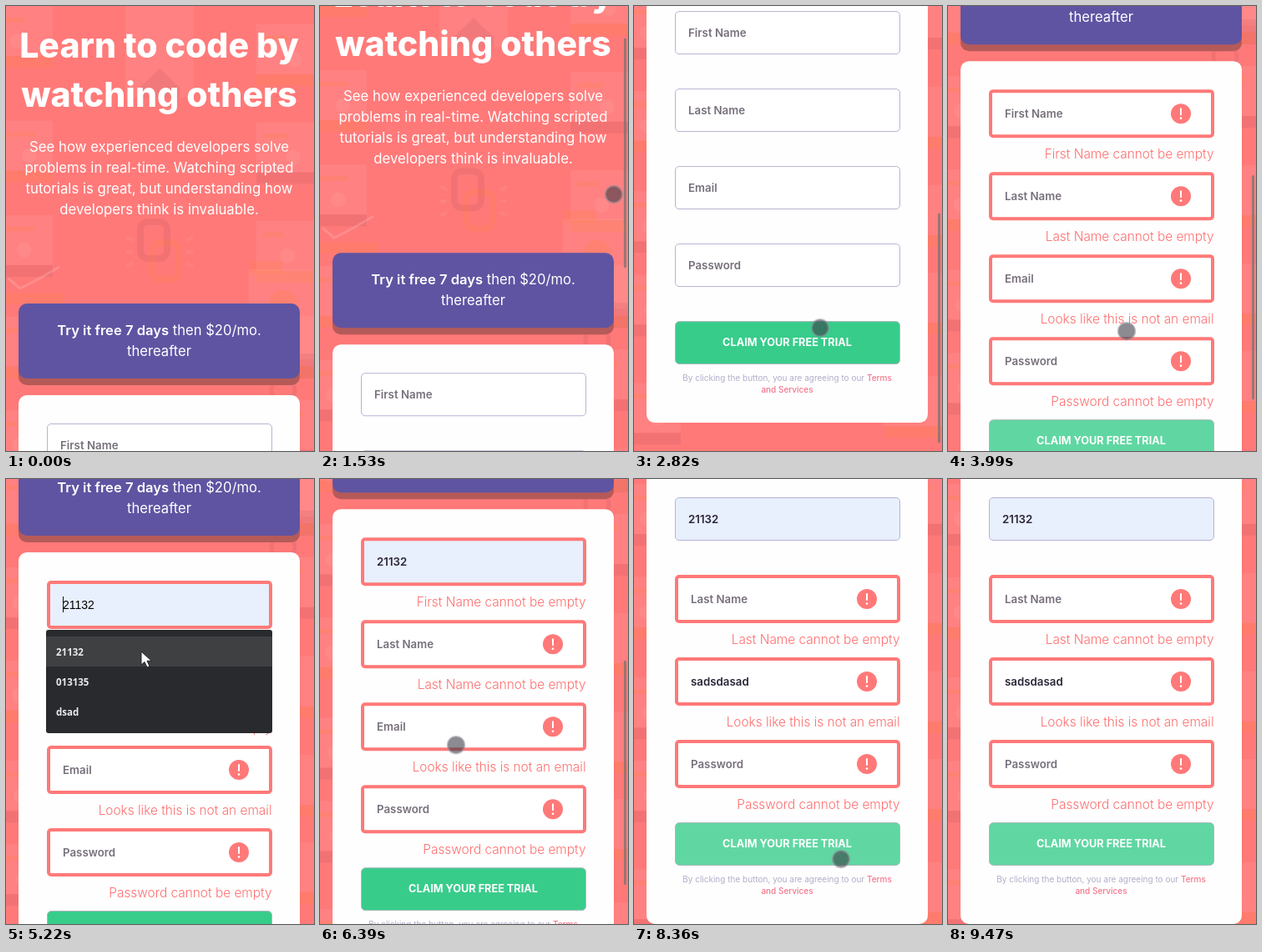
An HTML page that plays this animation: 369 px wide and 534 px high, repeating every 9800 ms.

```html
<!DOCTYPE html>
<html lang="en">
<head>
<meta charset="utf-8">
<title>Sign-up form</title>
<style>
  html, body { margin: 0; width: 100%; height: 100%; overflow: hidden; background: #ff7979; }
  svg { display: block; width: 369px; height: 534px; }
  text { font-family: Inter, "Open Sans", sans-serif; white-space: pre; }
  .mid { text-anchor: middle; }
  .title { font-size: 41px; font-weight: 800; fill: #fff; }
  .intro { font-size: 16.8px; fill: #fff; }
  .offer { font-size: 16.6px; fill: #fff; }
  .offer .strong { font-weight: 600; }
  .entry { font-size: 13.3px; font-weight: 600; }
  .preview { font: 14px "Liberation Sans", Arial, sans-serif; }
  .error { font-size: 15.4px; font-weight: 300; fill: #ff6f70; text-anchor: end; }
  .claim { font-size: 12.7px; font-weight: 700; fill: #fff; }
  .terms { font-size: 10px; fill: #b3aec9; }
  .terms .link { fill: #f5758b; font-weight: 500; }
  .option { font: 700 11.5px "Open Sans", sans-serif; fill: #e8eaed; }
</style>
</head>
<body>
<svg id="stage" viewBox="0 0 369 534"></svg>
<script>
const LOOP = 9800;
const CORAL = '#ff7979';
const stage = document.getElementById('stage');

function add(parent, tag, attrs = {}, text) {
  const el = document.createElementNS('http://www.w3.org/2000/svg', tag);
  set(el, attrs);
  if (text !== undefined) el.textContent = text;
  parent.append(el);
  return el;
}
function set(el, attrs) {
  for (const key in attrs) el.setAttribute(key, attrs[key]);
}
const show = (el, opacity) => set(el, { opacity: +opacity });
const move = (el, x, y) => set(el, { transform: `translate(${x} ${y})` });
const box = (parent, x, y, width, height, fill, rx = 0) =>
  add(parent, 'rect', { x, y, width, height, fill, rx });
const disc = (parent, cx, cy, r, fill) => add(parent, 'circle', { cx, cy, r, fill });
const label = (parent, cls, x, y, text) => add(parent, 'text', { class: cls, x, y }, text);

const clamp = p => Math.max(0, Math.min(1, p));
const linear = p => p;
const smooth = p => p * p * (3 - 2 * p);
const easeOut = p => 1 - (1 - p) ** 2;
const within = (t, a, b) => t >= a && t < b;
// Rises from `on` and falls from `off`, each over `fade` ms.
const pulse = (t, on, off, fade) => Math.min(clamp((t - on) / fade), 1 - clamp((t - off) / fade));

// Position after eased legs, each taking over from where the last one ended.
function travel(t, origin, legs) {
  return legs.reduce((at, { start, end, to, curve = smooth }) => {
    const p = curve(clamp((t - start) / (end - start)));
    return at.map((v, i) => v + (to[i] - v) * p);
  }, origin);
}

box(stage, 0, 0, 369, 534, CORAL);
const page = add(stage, 'g');

function drawBackdrop() {
  const PALE = 'rgba(255,255,255,.06)', DARK = 'rgba(110,50,70,.09)', WARM = 'rgba(255,130,40,.16)';
  const art = add(page, 'g');
  const line = (d, stroke, width) =>
    add(art, 'path', { d, stroke, 'stroke-width': width, fill: 'none', 'stroke-linejoin': 'round' });
  let seed = 7;
  const random = () => (seed = seed * 16807 % 2147483647) / 2147483647;

  // Loose icon tiles down both edges
  for (let y = 0; y < 1060; y += 115) {
    for (const x of [-14, 300]) {
      const top = y + random() * 30;
      box(art, x, top, 70, 60, PALE);
      box(art, x, top + 60, 70, 14, random() < .5 ? DARK : WARM);
      box(art, x + 8, top + 14, 20 + random() * 30, 5, WARM);
      disc(art, x + 20 + random() * 34, top + 42, 9, PALE);
    }
  }

  box(art, 143, 0, 82, 110, PALE);
  add(art, 'path', { d: 'M160 98l24-23 24 23v12h-48z', fill: DARK });

  // Chain link with sparks
  [[161, 259, DARK], [175, 284, WARM]].forEach(([x, y, stroke]) =>
    add(art, 'rect', { x, y, width: 32, height: 44, rx: 9, fill: 'none', stroke, 'stroke-width': 8 }));
  for (const side of [-1, 1])
    for (const tilt of [-1, 0, 1])
      line(`M${184 + side * 32} ${295 + tilt * 13}l${side * 8} ${tilt * 5}`, PALE, 4);

  line('M3 327l14 12 23-12 24-14', 'rgba(255,255,255,.15)', 3);
  box(art, 0, 344, 70, 14, WARM);

  // Folder
  box(art, 291, 306, 40, 15, WARM);
  box(art, 291, 316, 78, 108, PALE);
  box(art, 291, 417, 78, 30, DARK);
  disc(art, 332, 358, 17, WARM);
  add(art, 'circle', { cx: 332, cy: 461, r: 14, fill: 'none', stroke: DARK, 'stroke-width': 5 });
}
drawBackdrop();

// Heading and offer
label(page, 'title mid', 183.5, 61.5, 'Learn to code by');
label(page, 'title mid', 183.5, 121, 'watching others');
['See how experienced developers solve',
 'problems in real-time. Watching scripted',
 'tutorials is great, but understanding how',
 'developers think is invaluable.'
].forEach((text, i) => label(page, 'intro mid', 183.5, 175 + i * 25, text));

box(page, 15, 365, 337, 90, '#b55a58', 10);
box(page, 15, 357, 337, 90, '#5f54a2', 10);
const offer = label(page, 'offer mid', 183.5, 395);
add(offer, 'tspan', { class: 'strong' }, 'Try it free 7 days');
add(offer, 'tspan', {}, ' then $20/mo.');
label(page, 'offer mid', 183.5, 420, 'thereafter');

const card = box(page, 15, 467, 337, 528, '#fefefe', 10);

const fields = [
  ['First Name', 'First Name cannot be empty'],
  ['Last Name', 'Last Name cannot be empty'],
  ['Email', 'Looks like this is not an email'],
  ['Password', 'Password cannot be empty']
].map(([hint, message]) => {
  const group = add(page, 'g');
  const frame = add(group, 'rect');
  const text = add(group, 'text');
  const caret = box(group, 68, 19, 1, 19, '#111');
  const alert = add(group, 'g');
  disc(alert, 279, 29, 12, CORAL);
  box(alert, 278, 22, 2, 9, '#fff', 1);
  disc(alert, 279, 34.5, 1.3, '#fff');
  const error = label(group, 'error', 318.5, 83, message);
  return { hint, group, frame, text, caret, alert, error };
});

const submit = add(page, 'g');
const claim = add(submit, 'rect', { x: 49.5, y: .5, width: 269, height: 51, rx: 5, stroke: '#a9b9b8' });
label(submit, 'claim mid', 183.5, 30, 'CLAIM YOUR FREE TRIAL');
const terms = label(submit, 'terms mid', 183.5, 72);
add(terms, 'tspan', {}, 'By clicking the button, you are agreeing to our ');
add(terms, 'tspan', { class: 'link' }, 'Terms');
add(label(submit, 'terms mid', 183.5, 86), 'tspan', { class: 'link' }, 'and Services');

// Suggestion lists
const nameList = add(stage, 'g');
box(nameList, 48, 181, 271, 124, '#292a2d', 3);
const highlight = box(nameList, 48, 189, 271, 36, '#3f4042');
['21132', '013135', 'dsad'].forEach((text, i) => label(nameList, 'option', 60, 212 + i * 36, text));

const mailList = box(stage, 53, 280, 262, 51, '#292a2d', 3);
const mailOption = label(stage, 'option', 64, 310, 'sadsda');

const thumb = box(stage, 364, 9, 3, 276, '#757575', 1.5);
const touch = add(stage, 'g');
add(touch, 'circle', { r: 10, fill: 'rgba(55,55,65,.58)', stroke: 'rgba(140,140,150,.5)', 'stroke-width': 2.5 });
const arrow = add(stage, 'path', {
  d: 'M0 0v16l4-3.5 3 6.5 3-1.4-3-6.3h5.3z', fill: '#fff', stroke: '#222', 'stroke-width': 1
});

const SUBMITS = [3190, 7960];
const DRAGS = [
  { start: 1400, end: 1810, to: [252] },
  { start: 2080, end: 2890, to: [500] },
  { start: 3360, end: 4130, to: [379], curve: linear },
  { start: 6180, end: 6870, to: [479], curve: easeOut }
];
const POINTER = [
  { start: 520, end: 1130, to: [352, 226] },
  { start: 2200, end: 2950, to: [212, 400] },
  { start: 3190, end: 3360, to: [214, 291] },
  { start: 3360, end: 4130, to: [214, 412], curve: linear },
  { start: 4200, end: 4600, to: [172, 134] },
  { start: 5060, end: 5160, to: [162, 207] },
  { start: 5550, end: 6050, to: [163, 371] },
  { start: 6180, end: 6870, to: [163, 271], curve: easeOut },
  { start: 7210, end: 7420, to: [157, 377] },
  { start: 7420, end: 7690, to: [248, 456] },
  { start: 8900, end: 9440, to: [331, 546] }
];

// What the visitor has entered, and which field has focus.
function formState(t) {
  const typed = t < 7080 ? 0 : 3 + Math.ceil(Math.max(0, t - 7240) / 65);
  return {
    preview: within(t, 5090, 5550),
    focus: within(t, 4740, 5600) ? 0 : within(t, 7010, SUBMITS[1]) ? 2 : -1,
    values: [t >= 5090 ? '21132' : '', '', 'sadsdasad'.slice(0, typed), '']
  };
}

function drawField(field, y, { value, invalid, focused, preview, autofill }) {
  const { group, frame, text, caret, alert, error, hint } = field;
  const edge = invalid ? 4 : 1;
  const height = invalid ? 58 : 52;
  move(group, 0, y);
  set(frame, {
    x: 49 + edge / 2, y: edge / 2, width: 270 - edge, height: height - edge, rx: invalid ? 3 : 4.5,
    fill: autofill ? '#e8effd' : '#fff', stroke: invalid ? CORAL : '#b7b3d3', 'stroke-width': edge
  });
  set(text, {
    class: preview ? 'preview' : 'entry', x: 64 + edge, y: height / 2 + 4.5,
    fill: !value ? '#776f7b' : focused ? '#000' : '#2c2739'
  });
  text.textContent = value || hint;
  set(caret, { x: 68 + (value && !preview ? text.getComputedTextLength() : 0) });
  show(caret, focused);
  show(alert, invalid && !autofill);
  show(error, invalid);
}

function render(t) {
  const [scroll] = travel(t, [0], DRAGS);
  const { preview, focus, values } = formState(t);
  move(page, 0, -scroll);

  let y = 501;
  fields.forEach((field, i) => {
    const first = i === 0;
    const invalid = t >= SUBMITS[0] && !(first && t >= SUBMITS[1]);
    drawField(field, y, {
      value: values[i], invalid, focused: focus === i,
      preview: first && preview, autofill: first && values[0] !== ''
    });
    y += invalid ? 99 : 93;
  });
  move(submit, 0, y);
  set(card, { height: y + 122 - 467 });

  const hover = Math.max(pulse(t, 3080, 4740, 180), pulse(t, 7540, LOOP, 150));
  const mix = (a, b) => Math.round(a + (b - a) * hover);
  set(claim, { fill: `rgb(${mix(56, 96)},${mix(204, 215)},${mix(139, 162)})` });

  show(nameList, pulse(t, 4700, 5550, 120));
  show(highlight, t >= 5090);
  const mailFade = pulse(t, 7010, 7310, 170);
  show(mailList, mailFade);
  show(mailOption, Math.min(1, mailFade * 2.2));

  set(thumb, { y: 9 + scroll * .484, height: 534 * 534 / (y + 161) });
  show(thumb, .75 * Math.max(...DRAGS.map(d => pulse(t, d.start, d.end + 300, 100))));

  const [px, py] = travel(t, [343, 506], POINTER);
  const pointing = within(t, 5060, 5640);
  move(touch, px, py);
  move(arrow, px, py);
  show(touch, within(t, 520, 9440) && !pointing);
  show(arrow, pointing);
}

const start = performance.now();
function tick() {
  render((performance.now() - start) % LOOP);
  requestAnimationFrame(tick);
}
tick();
</script>
</body>
</html>
```
